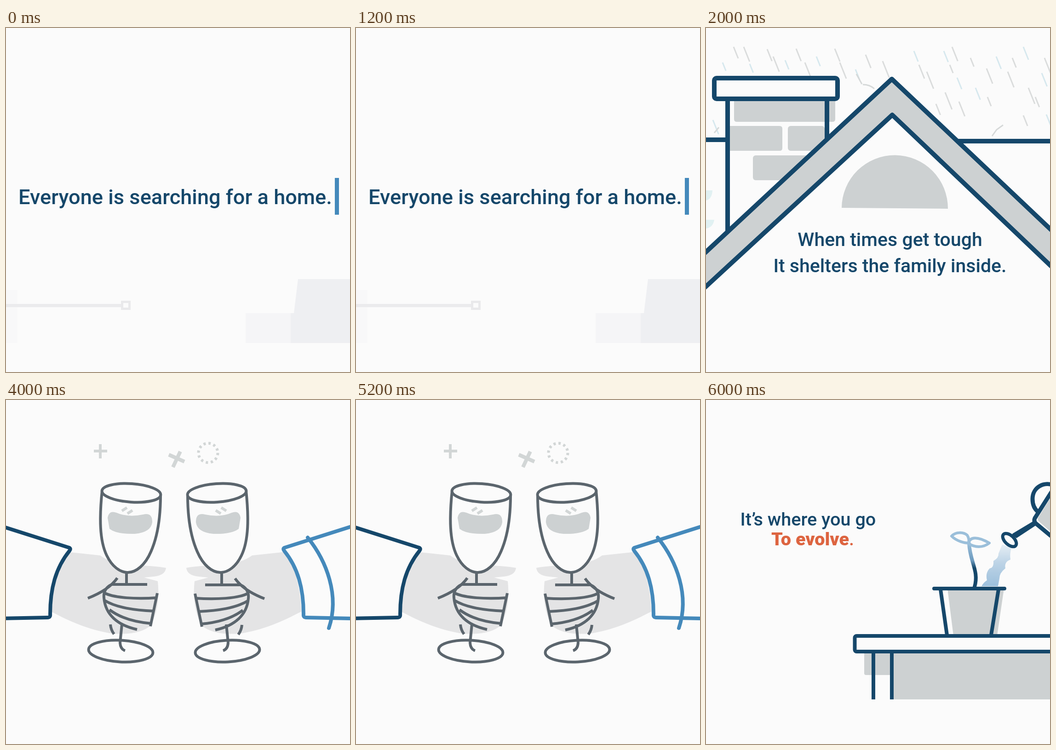
These frames come from a looping animation (748 px wide and 748 px high, 8000 ms). An HTML page:

```html
<!DOCTYPE html>
<html lang="en">
<head>
<meta charset="utf-8">
<title>A home</title>
<style>
  html, body { margin: 0; height: 100%; overflow: hidden; background: #fbfbfb; }
  svg { display: block; width: 100%; height: 100%; }
  text { font: 500 41px Roboto, Arial, sans-serif; fill: #15476a; text-anchor: middle; }
  .scene { visibility: hidden; }
  .line { fill: none; stroke: #15476a; stroke-linecap: round; stroke-linejoin: round; }
  .paper { fill: #fbfbfb; }
  .grey { fill: #cdd1d2; }
  .glass { fill: none; stroke: #5b656d; stroke-width: 6; }
  .spark { fill: none; stroke: #d2d6d6; stroke-width: 6; }
</style>
</head>
<body>
<svg viewBox="0 0 748 748">
  <defs>
    <linearGradient id="stem" gradientUnits="userSpaceOnUse" x1="0" y1="310" x2="0" y2="375">
      <stop offset="0" stop-color="#9bbfda"/>
      <stop offset=".6" stop-color="#6d9bbf"/>
      <stop offset=".85" stop-color="#15476a"/>
    </linearGradient>
    <linearGradient id="water" x2="0" y2="1">
      <stop offset="0" stop-color="#e6eef4"/>
      <stop offset=".45" stop-color="#bcd3e6"/>
      <stop offset="1" stop-color="#9dc0dc"/>
    </linearGradient>
    <g id="sleeve">
      <path d="M-8 275L137 321Q142 323 138 328C108 365 96 410 96 466Q97 473 90 473L-8 475" stroke-width="8"/>
    </g>
    <path id="shade" fill="#e4e4e5" d="M130 330L205 338C240 365 300 356 348 365Q346 382 320 384L300 386L330 394Q336 450 315 490Q290 512 232 508C180 500 140 482 98 460Q100 390 130 330Z"/>
    <g id="goblet" class="glass">
      <path class="paper" d="M209 197C203 255 203 305 219 338C231 363 248 374 263 375C283 376 303 358 315 330C331 294 336 250 336 207"/>
      <ellipse class="paper" cx="272.5" cy="202" rx="64" ry="20" transform="rotate(4 272.5 202)"/>
      <ellipse cx="249.5" cy="546" rx="70" ry="23.5" transform="rotate(3 249.5 546)"/>
      <path d="M262 375V401M252 488L248 528Q249 542 259 545"/>
      <path class="grey" stroke="none" d="M221 256Q224 239 240 245Q265 256 298 249Q319 244 318 266Q315 288 280 291Q240 292 225 280Z"/>
      <path class="spark" d="M252 241L263 234M264 247L275 240"/>
    </g>
    <g id="fingers" class="glass">
      <path d="M307 401H230Q211 410 213 430C216 467 243 490 285 499M242 387Q224 413 178 431M213 419C235 431 285 433 328 430M213 435C240 452 280 457 322 459M225 456C250 475 280 483 316 486M329 420L314 492M227 488Q228 500 235 509"/>
    </g>
  </defs>

  <g class="scene">
    <path fill="#f8f8f9" d="M0 570H25V685H0Z"/>
    <path fill="#ebebed" d="M0 600H250V607H0Z"/>
    <rect x="252.500" y="595.500" width="16" height="15" fill="#fbfbfb" stroke="#e9e9eb" stroke-width="5"/>
    <path fill="#f5f5f7" d="M521 620H625V685H521Z"/>
    <path fill="#eeeff2" d="M635 546H748V685H619V620H626Z"/>
    <text x="368" y="383" style="font-size:45.1px">Everyone is searching for a home.</text>
    <path fill="#4489bb" d="M715 326H724V406H715Z"/>
  </g>

  <g class="scene">
    <g id="rain" fill="none" stroke-width="3"></g>
    <path fill="#e1f1f2" d="M0 353H14Q13 372 0 375ZM0 417H18Q15 434 0 436Z"/>
    <path class="paper" d="M47 150H263V440H47Z"/>
    <g class="grey">
      <path d="M61 150H281V198Q281 204 275 204H67Q61 204 61 198Z"/>
      <path d="M52 213H160Q166 213 166 219V261Q166 267 160 267H52Z"/>
      <rect x="178" y="213" width="80" height="54" rx="6"/>
      <rect x="102" y="277" width="130" height="54" rx="6"/>
    </g>
    <g class="line" stroke-width="10">
      <path d="M47 158V442M263 158V240M-8 243H45M550 246H756"/>
      <rect class="paper" x="18" y="109" width="268" height="45" rx="5"/>
      <path class="grey" d="M-12 498L404 111L760 448V527L405 189L-12 573Z" stroke="none"/>
      <path class="paper" d="M-12 573L405 189L760 527V760H-12Z" stroke="none"/>
      <path d="M-12 498L404 111L760 448M-12 573L405 189L760 527"/>
    </g>
    <path class="grey" d="M295 391A115.500 115.500 0 0 1 526 393Z"/>
    <text x="400" y="474">When times get tough</text>
    <text x="400" y="531">It shelters the family inside.</text>
  </g>

  <g class="scene">
    <g class="spark">
      <path d="M191 111H220M205 96V127"/>
      <path d="M354 119L388 134M379 112L363 146" stroke-width="8"/>
      <circle cx="439.500" cy="115" r="21" stroke-dasharray="5 6"/>
    </g>
    <use href="#shade"/>
    <use href="#shade" transform="matrix(-1 0 0 1 740 0)"/>
    <g class="line">
      <use href="#sleeve" class="paper"/>
      <g stroke="#4489bb">
        <use href="#sleeve" class="paper" transform="matrix(-1 0 0 1 743 0)"/>
        <path d="M656 299C697 350 726 425 702 496" stroke-width="8"/>
      </g>
    </g>
    <use href="#goblet"/>
    <use href="#goblet" transform="matrix(-1 0 0 1 731 0)"/>
    <use href="#fingers"/>
    <use href="#fingers" transform="matrix(-1 0 0 1 740 1)"/>
  </g>

  <g class="scene">
    <text x="222" y="273" style="font-size:39.600px">It’s where you go</text>
    <text x="232" y="316" style="font-size:39.500px;font-weight:900;fill:#dd6440">To evolve<tspan font-weight="500" style="font-weight:500">.</tspan></text>
    <g class="grey">
      <path d="M344 545H404V598H348Q344 598 344 594Z"/>
      <path d="M404 545H748V651H404Z"/>
      <path d="M525 410H648L633 512H538Z"/>
    </g>
    <path fill="url(#water)" d="M644 314L664 322Q660 335 662 347Q648 352 651 366Q638 376 638 388L635 405H599Q604 396 611 392Q607 376 617 366Q626 365 625 350Q637 343 636 334Z"/>
    <g class="line" stroke-width="8">
      <path d="M364 549V651M404 549V651" stroke-linecap="butt"/>
      <rect class="paper" x="323.500" y="513" width="440" height="34" rx="4"/>
      <path d="M496 410H649M510 412L524 511M636 412L620 511"/>
      <path d="M584 406C594 372 574 352 572 312" stroke="url(#stem)"/>
      <g stroke="#9bbfda" stroke-width="6">
        <path d="M571 311C562 311 545 307 534 296C543 286 560 287 568 294Q573 302 571 311Z"/>
        <path d="M571 312C573 297 590 296 616 311C602 322 584 321 571 312Z"/>
      </g>
      <path d="M760 187C735 175 710 190 710 215Q710 234 722 243" stroke-width="9"/>
      <path class="paper" d="M760 186L715 257Q712 264 718 269L760 304" stroke-width="9"/>
      <path class="grey" stroke="none" d="M748 214L722 256Q720 261 725 265L748 285Z"/>
      <path d="M668 292L713 265L716 271L675 298Z" fill="#15476a" stroke-width="4"/>
      <ellipse class="paper" cx="660" cy="304.500" rx="18" ry="10" transform="rotate(43 660 304.500)" stroke-width="7"/>
    </g>
  </g>
</svg>
<script>
  const drops = [
    [36, 75], [60, 41], [82, 41], [95, 78], [133, 46], [146, 62], [172, 70], [196, 45],
    [215, 75], [240, 62], [280, 45], [291, 75], [325, 90], [347, 58], [384, 72], [452, 50],
    [463, 80], [480, 95], [517, 50], [535, 41], [530, 80], [546, 108], [550, 160], [575, 65],
    [586, 130], [610, 88], [612, 150], [631, 62], [656, 95], [666, 65], [690, 41], [701, 130],
    [716, 150], [730, 98], [736, 65], [690, 190], [740, 188], [520, 140], [500, 165], [15, 200]
  ];
  const streak = ([x, y], i) => {
    const len = 18 + i * 7 % 20;
    return `<path d="M${x} ${y}l${len * 0.4} ${len}" stroke="${i % 3 ? '#dadcdc' : '#d6e8ee'}"/>`;
  };
  document.getElementById('rain').innerHTML = drops.map(streak).join('') +
    '<path stroke="#d6d9d9" d="M327 100l12 22M341 123q15 0 25 9M622 235l10-14 14-10M18 228l10-12"/>';

  const HOLD = 2000;
  const scenes = [...document.querySelectorAll('.scene')];
  function draw() {
    const now = Math.floor(performance.now() / HOLD) % scenes.length;
    scenes.forEach((scene, i) => scene.style.visibility = i === now ? 'visible' : 'hidden');
    requestAnimationFrame(draw);
  }
  draw();
</script>
</body>
</html>
```
